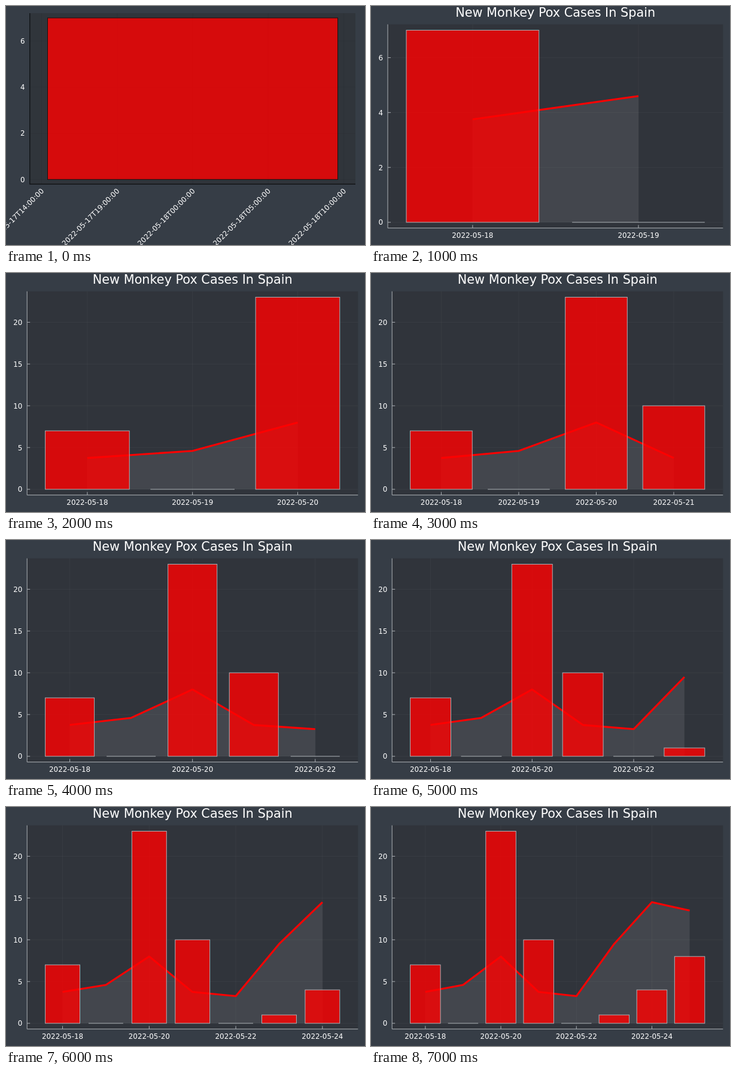
These frames come from a looping animation (600 by 400 pixels, 8000 ms). An HTML page:

```html
<!DOCTYPE html>
<html lang="en">
<head>
<meta charset="utf-8">
<title>Daily cases</title>
<style>
html, body { margin: 0; width: 100%; height: 100%; overflow: hidden; background: #363d46; }
svg { display: block; width: 600px; height: 400px; }
text { font-family: "DejaVu Sans", sans-serif; font-size: 11.9px; fill: #fff; }
</style>
</head>
<body>
<svg id="stage" viewBox="0 0 600 400"></svg>
<script>
const stage = document.getElementById("stage");
const cases = [7, 0, 23, 10, 0, 1, 4, 8];
const trend = [3.75, 4.6, 8, 3.75, 3.25, 9.5, 14.5, 13.5];
const STEP = 1000;
const FG = "#adb2b7";

const rect = (x, y, w, h, extra) =>
  `<rect x="${x}" y="${y}" width="${w}" height="${h}" ${extra}/>`;
const path = (d, stroke, width = 1, extra = "") =>
  `<path d="${d}" fill="none" stroke="${stroke}" stroke-width="${width}" ${extra}/>`;
const text = (x, y, s, anchor, extra = "") =>
  `<text x="${x}" y="${y}" text-anchor="${anchor}" ${extra}>${s}</text>`;
const bar = (x, y, w, h, stroke) =>
  rect(x, y, w, h, `fill="#f00" fill-opacity=".8" stroke="${stroke}"`);

// A single day: the axis is in hours and its labels are slanted.
function firstDay() {
  const yOf = v => 290.3 - v * 38.62;
  let out = rect(40, 12, 544, 286, 'fill="#30353b"');
  let grid = "";
  let labels = "";
  for (let v = 0; v <= 6; v += 2) {
    grid += `M40 ${yOf(v)}H584`;
    labels += text(31.7, yOf(v) + 4.4, v, "end");
  }
  ["17T14", "17T19", "18T00", "18T05", "18T10"].forEach((s, i) => {
    const x = 59.5 + i * 126.25;
    grid += `M${x} 12V298`;
    labels += text(0, 0, `2022-05-${s}:00:00`, "end",
      `transform="translate(${x + 4.5} 310.5) rotate(-45)"`);
  });
  out += path(grid, "#000", 1, 'stroke-opacity=".06"');
  out += bar(69.5, yOf(7), 485, 7 * 38.62, "#1a1010");
  out += path("M39.8 12V298.2H584", "#0c0d0f", 1.2);
  return out + labels;
}

function days(n) {
  const left = n === 2 ? 28 : 35.2;
  const right = 588.3, top = 30.7, bottom = 371.6, zero = 362;
  const start = n === 2 ? 59 : 65.6;
  const unit = (557.8 - start) / (n - 0.2);
  const peak = Math.max(...cases.slice(0, n));
  const scale = (zero - 40.5) / peak;
  const xOf = i => start + (i + 0.4) * unit;
  const yOf = v => zero - v * scale;

  let grid = "", ticks = "", labels = "";
  const yStep = peak > 10 ? 5 : 2;
  for (let v = 0; v <= peak; v += yStep) {
    grid += `M${left} ${yOf(v)}H${right}`;
    ticks += `M${left} ${yOf(v)}h5`;
    labels += text(left - 7.8, yOf(v) + 4.4, v, "end");
  }
  const xStep = n > 4 ? 2 : 1;
  for (let i = 0; i < n; i += xStep) {
    grid += `M${xOf(i)} ${top}V${bottom}`;
    ticks += `M${xOf(i)} ${bottom}v-5`;
    labels += text(xOf(i), 387.6, `2022-05-${18 + i}`, "middle");
  }

  const line = trend.slice(0, n).map((v, i) => `${xOf(i)} ${yOf(v)}`).join("L");
  const area = `M${line}L${xOf(n - 1)} ${zero}H${xOf(0)}Z`;
  const bars = cases.slice(0, n).map((v, i) =>
    bar(start + i * unit, yOf(v), unit * 0.8, v * scale, FG)).join("");
  // Zero-height rectangles are not painted, so they get a plain line.
  const flat = cases.slice(0, n).map((v, i) =>
    v ? "" : `M${start + i * unit} ${zero}h${unit * 0.8}`).join("");

  return rect(left, top, right - left, bottom - top, 'fill="#30343b"')
    + path(grid, "#fff", 1, 'stroke-opacity=".04"')
    + `<path d="${area}" fill="#fff" fill-opacity=".09"/>`
    + path("M" + line, "#f00", 3.1, 'stroke-linejoin="round"')
    + bars
    + path(flat, FG)
    + path(`M${left} ${top}V${bottom}H${right}` + ticks, FG)
    + labels
    + text((left + right) / 2, 18.2, "New Monkey Pox Cases In Spain", "middle",
      'style="font-size:20.8px"');
}

let shown = 0;
const origin = performance.now();
function draw(now) {
  const n = 1 + Math.floor(Math.max(0, now - origin) / STEP) % cases.length;
  if (n !== shown) {
    stage.innerHTML = n === 1 ? firstDay() : days(n);
    shown = n;
  }
  requestAnimationFrame(draw);
}
draw(origin);
</script>
</body>
</html>
```
